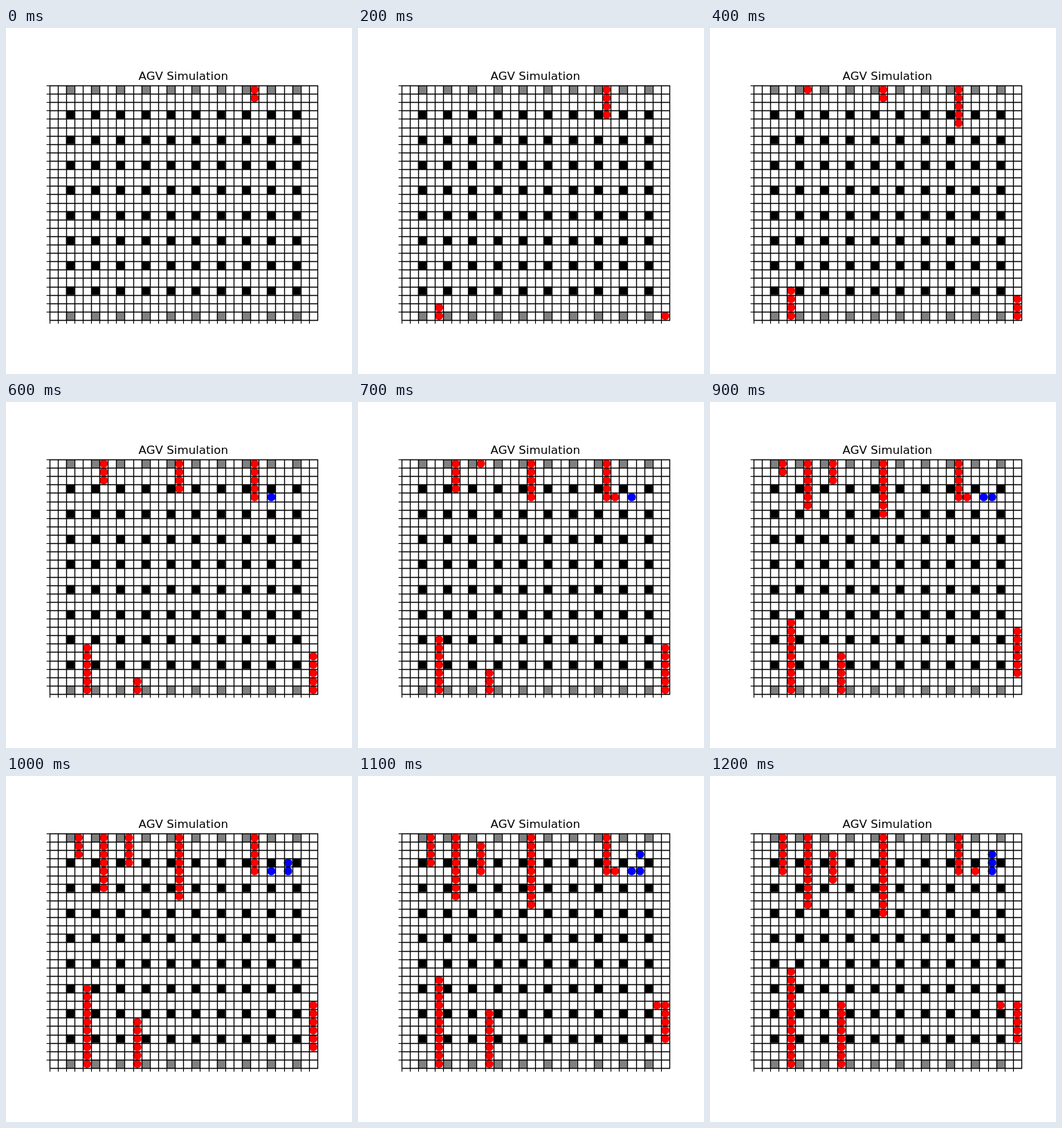
An HTML page with a canvas for the animation above (1300 ms loop, 500 by 500 pixels).

```html
<!DOCTYPE html>
<html lang="en">
<head>
<meta charset="utf-8">
<title>AGV Simulation</title>
<style>
html, body { margin: 0; width: 100%; height: 100%; overflow: hidden; background: #fff; }
canvas { display: block; width: 500px; height: 500px; }
</style>
</head>
<body>
<canvas id="stage" width="500" height="500"></canvas>
<script>
const ctx = document.getElementById('stage').getContext('2d');
const COLS = 32, ROWS = 28, STEP = 100, STEPS = 13;
const LEFT = 62.5, CELL = 387.5 / COLS, TOP = 252.5 - CELL * ROWS / 2;
const px = c => LEFT + c * CELL;
const py = r => TOP + r * CELL;
const snap = v => Math.floor(v + 0.5) + 0.5;

// Corner lists; a vehicle spends one extra step turning at each inner corner.
const queues = [
  { start: -1, route: [[24, 0], [24, 4], [28, 4], [28, 2], [29, 2]], pickup: 26, loads: 3 },
  { start: 1, route: [[4, 27], [4, 0]] },
  { start: 2, route: [[31, 27], [31, 20], [20, 20]], count: 6 },
  { start: 3, route: [[15, 0], [15, 27]] },
  { start: 4, route: [[6, 0], [6, 27]] },
  { start: 5, route: [[10, 27], [10, 0]] },
  { start: 7, route: [[9, 0], [9, 27]], count: 4 },
  { start: 8, route: [[3, 0], [3, 27]] }
];

function expand(route) {
  const path = [route[0]];
  for (let i = 1; i < route.length; i++) {
    let [x, y] = route[i - 1];
    const [tx, ty] = route[i];
    if (i > 1) path.push([x, y]);
    while (x !== tx || y !== ty) {
      x += Math.sign(tx - x);
      y += Math.sign(ty - y);
      path.push([x, y]);
    }
  }
  return path;
}

const same = (a, b) => a[0] === b[0] && a[1] === b[1];

// Vehicles advance one cell per step, leader first, and wait while the next cell is taken.
function simulate({ start, route, count = Infinity, pickup, loads = 0 }) {
  const path = expand(route), cars = [], states = [];
  const taken = (cell, self) => cars.some(c => c !== self && same(path[c.at], cell));
  for (let t = start; t < STEPS; t++) {
    for (const car of cars) {
      const next = path[car.at + 1];
      if (next && !taken(next, car)) car.at++;
    }
    if (cars.length < count && !taken(path[0])) cars.push({ at: 0 });
    states[t] = cars.map((car, i) => {
      const [x, y] = path[car.at];
      return { x, y, loaded: i < loads && x >= pickup };
    });
  }
  return states;
}

const runs = queues.map(simulate);

function drawCells() {
  for (let r = 0; r < ROWS; r += 3) {
    ctx.fillStyle = r === 0 || r === ROWS - 1 ? '#808080' : '#000';
    for (let c = 2; c < COLS; c += 3) ctx.fillRect(px(c), py(r), CELL, CELL);
  }
}

function drawCar({ x, y, loaded }) {
  ctx.fillStyle = loaded ? '#00f' : '#f00';
  ctx.beginPath();
  ctx.arc(px(x + 0.5), py(y + 0.5), CELL / 2, 0, Math.PI * 2);
  ctx.fill();
}

function line(x1, y1, x2, y2, width) {
  ctx.lineWidth = width;
  ctx.beginPath();
  ctx.moveTo(x1, y1);
  ctx.lineTo(x2, y2);
  ctx.stroke();
}

function drawGrid() {
  const x0 = snap(px(0)), x1 = snap(px(COLS));
  const y0 = snap(py(0)), y1 = snap(py(ROWS));
  ctx.strokeStyle = '#000';
  for (let c = 0; c <= COLS; c++) {
    const x = snap(px(c));
    line(x, y0 - 0.5, x, y1 + 0.5, 1.39);
    if (c < COLS) line(x, y1, x, y1 + 4.9, 1.11);
  }
  for (let r = 0; r <= ROWS; r++) {
    const y = snap(py(r));
    line(x0 - 0.5, y, x1 + 0.5, y, 1.39);
    if (r < ROWS) line(x0, y, x0 - 4.9, y, 1.11);
  }
}

function draw() {
  const t = Math.floor(performance.now() / STEP) % STEPS;
  ctx.fillStyle = '#fff';
  ctx.fillRect(0, 0, 500, 500);
  drawCells();
  for (const run of runs) (run[t] || []).forEach(drawCar);
  drawGrid();
  ctx.fillStyle = '#000';
  ctx.font = '16.667px "DejaVu Sans", sans-serif';
  ctx.textAlign = 'center';
  ctx.fillText('AGV Simulation', 256.25, 75);
  requestAnimationFrame(draw);
}
draw();
</script>
</body>
</html>
```
